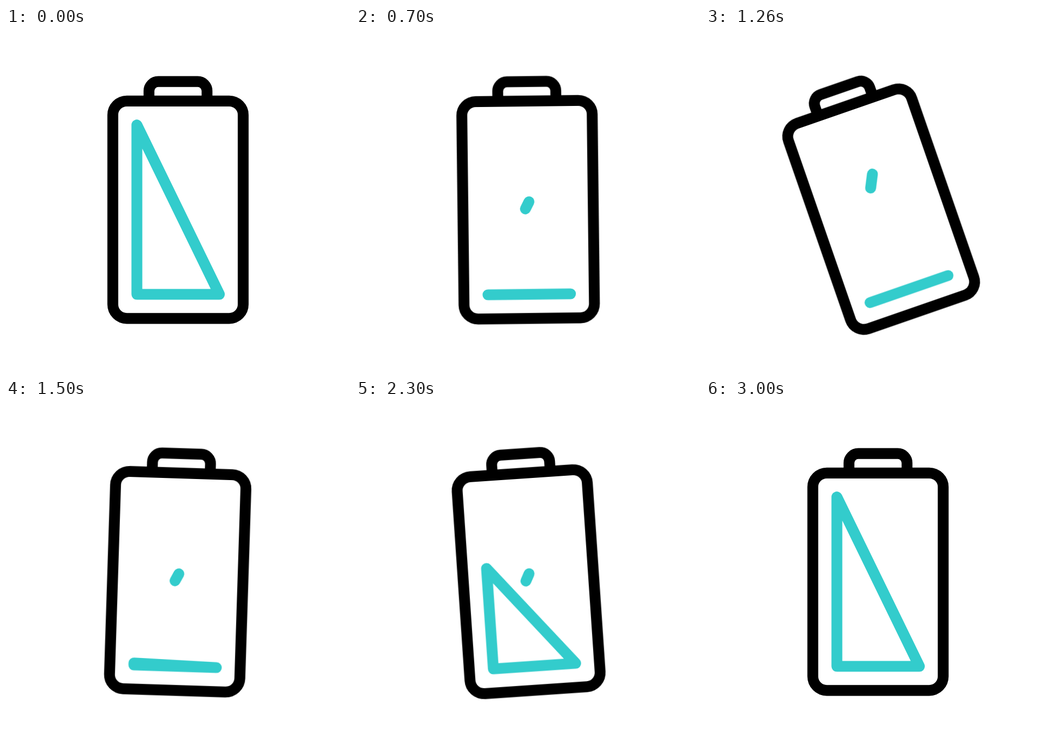
An HTML page that plays this animation: 640 px wide and 640 px high, repeating every 3.42 s.

```html
<!DOCTYPE html>
<html lang="en">
<head>
<meta charset="utf-8">
<title>Charging battery</title>
<style>
  html, body { margin: 0; width: 100%; height: 100%; overflow: hidden; background: #fff; }
  svg { display: block; width: 100%; height: 100%; }

  svg {
    --loop: 3420ms;
    --smooth: cubic-bezier(.3333, 0, .6667, 1);
    fill: none;
    stroke: #000;
    stroke-width: 20.2;
    stroke-linecap: round;
    stroke-linejoin: round;
  }
  .cap { stroke-linecap: butt; }
  .level, .bolt { stroke: #33cccc; }

  .battery {
    transform-origin: 320px 320px;
    animation: swing var(--loop) var(--smooth) infinite;
  }
  .level { animation: level var(--loop) var(--smooth) infinite; }
  .bolt {
    stroke-dasharray: 100 101;
    animation: flash var(--loop) var(--smooth) infinite;
  }

  /* 0.6 s, 1.22 s, 1.6 s, 2.2 s, 2.6 s */
  @keyframes swing {
    0% { transform: rotate(0deg); }
    17.544% { transform: rotate(0deg); animation-timing-function: cubic-bezier(.53, 0, .74, 1); }
    35.673% { transform: rotate(-20deg); animation-timing-function: cubic-bezier(.33, 0, .574, 1); }
    46.784% { transform: rotate(5deg); }
    64.327% { transform: rotate(-5deg); animation-timing-function: cubic-bezier(.25, 0, .58, 1); }
    76.023%, 100% { transform: rotate(0deg); }
  }

  /* drains until 0.6 s, fills from 1.4 s to 3 s */
  @keyframes level {
    0%, 87.719%, 100% { d: path("M243.5 180.5 L243.5 495.5 L397 495.5 Z"); }
    17.544%, 40.936% { d: path("M243.5 495.5 L243.5 495.5 L397 495.5 Z"); }
  }

  /* three passes of 0.8 s, each drawn and then wiped from the lower end */
  @keyframes flash {
    0%, 17.544% { stroke-dashoffset: 100.5; }
    29.24% { stroke-dashoffset: 0; }
    40.936% { stroke-dashoffset: -100.5; }
    52.632% { stroke-dashoffset: -201; }
    64.327% { stroke-dashoffset: -301.5; }
    76.023% { stroke-dashoffset: -402; }
    87.719%, 100% { stroke-dashoffset: -502.5; }
  }
</style>
</head>
<body>
<svg viewBox="0 0 640 640">
  <g class="battery">
    <path class="cap" d="M266 136 V117 A17.3 17.3 0 0 1 283.3 99.7 H356.7 A17.3 17.3 0 0 1 374 117 V136"/>
    <rect x="198.7" y="135.8" width="242.6" height="404.5" rx="26"/>
    <path class="level" d="M243.5 180.5 L243.5 495.5 L397 495.5 Z"/>
    <path class="bolt" pathLength="100" d="M315 336.5 L331 305.3 H309 L326 271"/>
  </g>
</svg>
</body>
</html>
```
